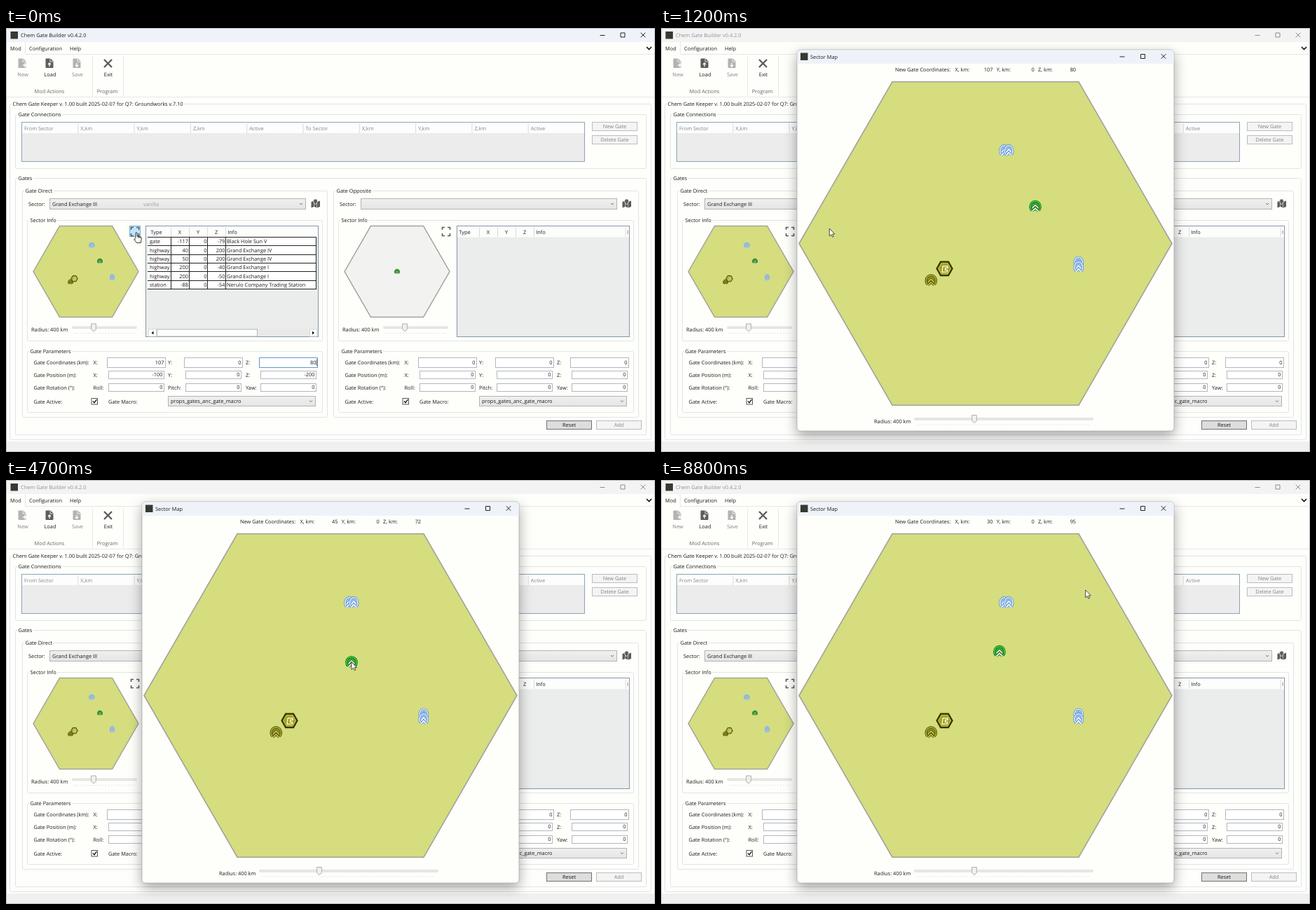
Write an HTML page that moves like this. It is 926 px wide and 605 px high and loops after 8.9 s.

```html
<!DOCTYPE html>
<html lang="en">
<head>
<meta charset="utf-8">
<title>Sector Map</title>
<style>
html, body { margin: 0; width: 100%; height: 100%; overflow: hidden; background: #fefefb; }
svg { display: block; width: 926px; height: 605px; }
text { font: 7.4px "Open Sans", "Noto Sans", sans-serif; fill: #1c1c1c; text-rendering: geometricPrecision; white-space: pre; }
.halo { paint-order: stroke; stroke: #fefefb; stroke-width: 4px; }
.dim { fill: #858585; }
.mid { text-anchor: middle; }
.end { text-anchor: end; }
.line { fill: none; stroke: #222; stroke-width: 1; }
.active { fill: #eff3f9; }
#bar { fill: #f3f3f3; }
#bar.active { fill: #eff3f9; }
.inactive text { fill: #929292; }
.inactive .line { stroke: #8b8b8b; }
#panel { filter: drop-shadow(0 7px 9px rgba(0, 0, 0, .34)); }
</style>
</head>
<body>
<svg id="stage" viewBox="0 0 926 605"></svg>
<script>
const BG = '#fefefb';
const text = (x, y, s, cls = '', extra = '') => `<text x="${x}" y="${y + 2.6}" class="${cls}" ${extra}>${s}</text>`;
const rect = (x, y, w, h, fill, stroke = 'none', rx = 0) =>
  `<rect x="${x}" y="${y}" width="${w}" height="${h}" fill="${fill}" stroke="${stroke}" rx="${rx}"/>`;
const path = (d, stroke, w = 1, fill = 'none') => `<path d="${d}" stroke="${stroke}" stroke-width="${w}" fill="${fill}"/>`;
const group = (x, y, s, body) => `<g transform="translate(${x} ${y}) scale(${s})">${body}</g>`;
const frame = (x, y, r, b, label) =>
  rect(x + .5, y + .5, r - x, b - y, 'none', '#dfe5e8', 2) + text(x + 4.5, y, label, 'halo');
const button = (x, y, label, on) =>
  rect(x + .5, y + .5, 64, 12, on ? '#dddddd' : '#f4f4f4', on ? '#707070' : '#b9bec1') +
  text(x + 32.5, y + 6.7, label, on ? 'mid' : 'mid dim');
const field = (x, y, w, h, value) =>
  rect(x + .5, y + .5, w, h, '#fff', '#b2b8bf') + text(x + w - 1.5, y + h / 2 + .2, value, 'end');
const chevron = (x, y) => path(`M${x - 2} ${y - 1}l2 2 2-2`, '#666', .9);

const combo = (x, y, w, h, label) =>
  rect(x + .5, y + .5, w, h, 'url(#comboFill)', '#b4b4b4') + text(x + 4, y + h / 2 + .4, label) +
  chevron(x + w - 6, y + h / 2 + .5);

const hexagon = (x, y, rx, ry, fill, w) =>
  path(`M${x - rx} ${y}L${x - rx / 2} ${y - ry}H${x + rx / 2}L${x + rx} ${y}L${x + rx / 2} ${y + ry}H${x - rx / 2}Z`, '#a3a399', w, fill);

const slider = (x, y, w, knob) =>
  rect(x, y - 1.3, w, 2.4, '#e9ecec', '#dadddd') +
  path(`M${x + 3} ${y + 8}h${w - 6}`, '#d2d2d2', 1).replace('/>', ' stroke-dasharray="1 3"/>') +
  path(`M${knob - 3.4} ${y - 5.5}h6.8v8l-3.4 3-3.4-3z`, '#b0b0b0', 1, '#f0f0f0');

const arch = (rx, edge, ring, fill, chev) => {
  const d = `M${-rx * .72} 6A${rx} 7.7 0 1 1 ${rx * .72} 6`;
  const v = `M${-rx * .6} 2.6L0-1.6 ${rx * .6} 2.6M${-rx * .6} 7L0 2.8 ${rx * .6} 7`;
  return path(d, edge, 3.2, fill) + path(d, ring, 1.5) + path(v, edge, 3) + path(v, chev, 1.6);
};
const ICONS = {
  fresh: arch(7.2, '#245c20', '#28e534', '#45a935', '#f8fff4'),
  gate: arch(7.2, '#43430d', '#b9b92b', '#929322', '#d0d04a'),
  highway: arch(5.8, '#5f92d2', '#e4f0ff', '#9fc0e8', '#ffffff'),
  station: path('M-11 0L-5.5-9.7H5.5L11 0 5.5 9.7H-5.5Z', '#34340e', 2.2, '#a2a31d') +
    path('M-8.8 0L-4.4-7.6H4.4L8.8 0 4.4 7.6H-4.4Z', '#cccb39', 1) +
    path('M-3.5 5L-2.5-3.5H4.5V-1H1V2H4V4.5Z', '#fff', 1.2, '#a2a31d')
};
const SITES = [['highway', 40, 200], ['highway', 50, 200], ['highway', 200, -40], ['highway', 200, -50],
  ['gate', -117, -79], ['station', -88, -54]];
const sites = (cx, cy, km, size) =>
  SITES.map(([kind, x, z]) => group(cx + x * km, cy - z * km, size, ICONS[kind])).join('');

const appIcon = (x, y) => rect(x - 5, y - 5, 10.5, 10.5, '#353a32');
const controls = (x, y, gap) =>
  `<path class="line" d="M${x - 3.5} ${y + .5}h7M${x + gap - 3} ${y - 3}h6v6h-6zM${x + 2 * gap - 3.3} ${y - 3.3}l6.6 6.6m0-6.6l-6.6 6.6"/>`;

function ribbon() {
  const doc = (x, color, mark) =>
    path(`M${x - 5} 44h6.5l3.5 3.5v9h-10z`, color, 1, color) + path(`M${x + 1} 44v4h4`, BG, .8) + path(mark, '#fff', 1.3);
  return `<g id="caption">` + `<rect id="bar" width="926" height="20"/>` + appIcon(11.5, 10) +
    text(21, 10, 'Chem Gate Builder v0.4.2.0') + controls(851, 10, 29) + '</g>' +
    path('M0 37.5H1M27.5 20V37.5M27 37.5H925M0 98.5H925M123.5 40V97M167.5 40V97', '#e5e8ea') +
    text(6, 29, 'Mod') + text(33, 29, 'Configuration') + text(91, 29, 'Help') +
    path('M914 27l3.5 3.5 3.5-3.5', '#111', 1.6) +
    doc(23, '#b3b3b3', 'M24 53h6m-3-3v6') + doc(62, '#5d5d5d', 'M62 55v-5m-2 2l2-2 2 2') +
    doc(101, '#b3b3b3', 'M101 50v5m-2-2l2 2 2-2') +
    path('M140 45l11 11m0-11l-11 11', '#5b5b5b', 2.3) +
    text(24, 66, 'New', 'mid dim') + text(63, 66, 'Load', 'mid') + text(102, 66, 'Save', 'mid dim') +
    text(146, 66, 'Exit', 'mid') + text(62, 90.5, 'Mod Actions', 'mid', 'style="fill:#666"') +
    text(144.5, 90.5, 'Program', 'mid', 'style="fill:#666"');
}

function connections() {
  const names = ['From Sector', 'X,km', 'Y,km', 'Z,km', 'Active', 'To Sector', 'X,km', 'Y,km', 'Z,km', 'Active'];
  const left = i => 22.5 + i * 80.3;
  return frame(13, 123, 913, 200, 'Gate Connections') + rect(22.5, 134.5, 803, 56, '#ececec', '#8aa4bb') +
    rect(23, 135, 802, 15, '#fdfdfc') + names.map((n, i) =>
      text(left(i) + 3.5, 143, n, 'dim') + (i ? path(`M${left(i)} 136V150`, '#dadada') : '')).join('') +
    button(836, 134, 'New Gate') + button(836, 153, 'Delete Gate');
}

function table(rows) {
  const shift = rows.length ? 0 : -4;
  const heads = [['Type', 214.5], ['X', 248], ['Y', 274], ['Z', 300], ['Info', 323]];
  let out = rect(199.5, 282.5, 246, 158, '#ebecec', '#8496a5') + rect(200, 283, 245, 15.5, '#fdfdfc') +
    heads.map(([s, x]) => text(x + shift, 291.5, s, 'mid')).join('') +
    [235, 261, 287, 313].map(x => path(`M${x + shift + .5} 284V298`, '#d8dada')).join('');
  if (!rows.length) return out + path('M440 284V298', '#d8dada') + text(442, 291.5, 'I', '', 'style="fill:#a33"');
  out += rect(202.5, 298.5, 240, 74, '#fff');
  rows.forEach((r, i) => {
    const y = 304.8 + i * 12.35;
    out += text(205, y, r[0]) + [260, 286.5, 312.5].map((x, k) => text(x, y, r[k + 1], 'end')).join('') + text(315, y, r[4]);
  });
  for (let i = 0; i < 7; i++) out += path(`M202 ${Math.round(298 + i * 12.35) + .5}H443`, '#222');
  out += [235, 261, 287, 313, 442].map(x => path(`M${x + .5} 298V373`, '#222')).join('');
  return out + rect(203, 429.5, 241, 10.5, '#e9e9e9') + rect(203.5, 430, 11, 10, '#fff', '#d8d8d8') +
    rect(215.5, 430, 143, 10, '#fdfdfd', '#b8b8b8') + rect(433.5, 430, 10, 10, '#fff', '#d8d8d8') +
    path('M210.5 432.5v5l-3-2.5zM437 432.5v5l3-2.5z', 'none', 0, '#111');
}

function gatePanel(title, sector, rows, values) {
  const filled = rows.length > 0;
  let out = frame(23, 232, 458, 555, title) + text(32, 251, 'Sector:') + combo(62, 243, 365, 15, sector) +
    (filled ? text(196, 251, 'vanilla', '', 'style="fill:#a2a2a2"') : '') +
    path('M435.5 248l4-1.5v8.500l-4 1.500zM440 247l3.500 1.500v8l-3.500-1.500zM444 248l4-1.500v8.500l-4 1.500z', 'none', 0, '#5c5c5c') +
    path('M438.500 247a3 3 0 0 1 6 0q0 2-3 5q-3-3-3-5z', BG, .7, '#5c5c5c') +
    frame(30, 274, 451, 446, 'Sector Info') +
    hexagon(114, 347.5, 75, 65, filled ? '#d5dd7f' : '#f2f2f0', 1.5) +
    (filled ? sites(114, 347.5, .1873, .43) + group(134, 332.5, .43, ICONS.fresh) : group(114, 347.5, .43, ICONS.fresh)) +
    (filled ? '<rect id="hover" x="176.5" y="282.5" width="15" height="15" fill="#bee6fd" stroke="#79aecb"/>' : '') +
    path('M178.500 288v-3.500h3.500m4 0h3.500v3.500m0 5v3.500h-3.500m-4 0h-3.500v-3.500', '#5d5d5d', 1.6) +
    table(rows) + text(36, 430, 'Radius: 400 km') + slider(95, 427.5, 91, 125) +
    frame(30, 461, 451, 548, 'Gate Parameters');
  const labels = [['Gate Coordinates (km):', 'X:', 'Y:', 'Z:'], ['Gate Position (m):', 'X:', 'Y:', 'Z:'],
    ['Gate Rotation (°):', 'Roll:', 'Pitch:', 'Yaw:']];
  labels.forEach(([label, ...axes], r) => {
    const y = 477.5 + r * 18;
    out += text(39.5, y, label);
    axes.forEach((axis, i) => {
      const x = [144, 254, 361][i];
      out += text([124.5, 231, 342][i], y, axis) +
        (r ? field(x + 2, y - 6.5, 79, 11, values[r][i]) : field(x, y - 7.5, 83, 14, values[r][i]));
    });
  });
  return out + text(39.5, 533, 'Gate Active:') + rect(122, 528.5, 8.500, 8.500, '#fff', '#555') +
    path('M124 532.5l2 2.200 3.300-4.500', '#111', 1.3) + text(146, 533, 'Gate Macro:') +
    combo(231, 525, 210, 14, 'props_gates_anc_gate_macro');
}

function popup() {
  return `<g id="popup"><rect id="panel" x="194" y="31" width="538" height="544" rx="4.5" fill="${BG}" stroke="#a9acae" stroke-width=".8"/>` +
    path('M194.500 51V35.500q0-4 4-4H727.500q4 0 4 4V51z', 'none', 0, '#eff3f9') + appIcon(204, 40.5) +
    text(213, 41, 'Sector Map') + controls(658, 40.5, 29.5) + text(334, 59.5, 'New Gate Coordinates:') +
    ['X', 'Y', 'Z'].map((a, i) => text(419.5 + i * 59.3, 59.5, a + ', km:') +
      text(473.5 + i * 59.3, 59.5, '0', 'end', `id="val${a}"`)).join('') +
    hexagon(463, 307.5, 266, 230.7, '#d5dd7f', 1.6) + sites(463, 307.5, KM, 1) +
    `<g id="gate">${ICONS.fresh}</g>` + text(304, 561, 'Radius: 400 km') + slider(362, 558, 254, 447) + '</g>';
}

const KM = .664;
const zeros = [[0, 0, 0], [0, 0, 0], [0, 0, 0]];
const sectorRows = [
  ['gate', -117, 0, -79, 'Black Hole Sun V'],
  ['highway', 40, 0, 200, 'Grand Exchange IV'],
  ['highway', 50, 0, 200, 'Grand Exchange IV'],
  ['highway', 200, 0, -40, 'Grand Exchange I'],
  ['highway', 200, 0, -50, 'Grand Exchange I'],
  ['station', -88, 0, -54, 'Nerulo Company Trading Station']
];

document.getElementById('stage').innerHTML =
  '<defs><linearGradient id="comboFill" x2="0" y2="1"><stop stop-color="#f0f0f0"/><stop offset="1" stop-color="#e5e5e5"/></linearGradient></defs>' +
  rect(0, 0, 926, 605, BG) + ribbon() + frame(5, 108, 920, 587, 'Chem Gate Keeper v. 1.00 built 2025-02-07 for Q7: Groundworks v.7.10') +
  connections() + frame(13, 214, 913, 580, 'Gates') +
  gatePanel('Gate Direct', 'Grand Exchange III', sectorRows, [[107, 0, 80], [-100, 0, -200], [0, 0, 0]]) +
  '<g id="focus">' + path('M361 470.500H445M361 484.500H445M361.500 470V485M444.500 470V485', '#5b9bd0') + path('M443.200 472.500V482', '#111', .7) + '</g>' +
  `<g transform="translate(444)">${gatePanel('Gate Opposite', '', [], zeros)}</g>` +
  button(771, 560, 'Reset', true) + button(842, 560, 'Add') + rect(1, 590, 924, 15, '#f0f0f0') +
  path('M.5 0V605M925.500 0V605M0 .5H926M0 604.500H926', '#b9bcbd') + popup() +
  `<g id="arrow">${path('M0 0V10.800L2.500 8.500 4.200 12.200 5.900 11.400 4.300 7.900H7.600Z', '#222', .8, '#fff')}</g>` +
  `<g id="hand">${path('M-1 8V1Q-1-.3 0-.3T1.200 1V5.200L6 6Q7.500 6.300 7.300 8L6.300 14.500H.3L-3.200 9.500Q-3.300 7.500-1 9.500M3 5.500V8M5 6V8', '#222', .9, '#fff')}</g>`;

const $ = id => document.getElementById(id);
const show = (id, on) => $(id).style.display = on ? '' : 'none';

// Interpolates rows of [time, a, b], easing only where asked.
function along(keys, t, ease = p => p) {
  const i = keys.findIndex(k => k[0] > t);
  if (i < 0) return keys[keys.length - 1].slice(1);
  if (i === 0) return keys[0].slice(1);
  const [a, b] = [keys[i - 1], keys[i]];
  const p = ease((t - a[0]) / (b[0] - a[0]));
  return [1, 2].map(n => a[n] + (b[n] - a[n]) * p);
}
const smooth = p => p * p * (3 - 2 * p);

const dragKeys = [[2300, 107, 80], [3400, 66, 59], [4300, 50, 66], [6200, 27, 95], [6800, 30, 95]];
const reach = [[900, 186, 292], [2100, 533.5, 254.4]];
const leave = [[7300, 482.9, 244.4], [8500, 605.7, 157]];

function draw(now) {
  const t = Math.floor(now % 8900 / 100) * 100;
  const open = t >= 500, arrow = t >= 600;
  show('popup', open);
  show('focus', !open);
  show('hover', !arrow);
  show('hand', !arrow);
  show('arrow', arrow);
  $('bar').classList.toggle('active', !open);
  $('caption').classList.toggle('inactive', open);

  const [s, dx, dy] = t < 600 ? [.873, -5.3, -2.7] : t < 700 ? [.987, -.5, -.5] : [1, 0, 0];
  $('popup').setAttribute('transform', `translate(${463 + dx} ${303 + dy}) scale(${s}) translate(-463 -303)`);
  $('popup').setAttribute('opacity', arrow ? 1 : .2);

  const [x, z] = along(dragKeys, t);
  const gx = 463 + x * KM, gy = 307.5 - z * KM;
  $('gate').setAttribute('transform', `translate(${gx} ${gy})`);
  $('valX').textContent = Math.round(x);
  $('valZ').textContent = Math.round(z);

  const [px, py] = t < 2200 ? along(reach, t, smooth) : t < 7300 ? [gx, gy] : along(leave, t, smooth);
  $('arrow').setAttribute('transform', `translate(${px} ${py})`);
  $('hand').setAttribute('transform', 'translate(186 292)');
}

const start = performance.now();
function tick() {
  draw(performance.now() - start);
  requestAnimationFrame(tick);
}
tick();
</script>
</body>
</html>
```
